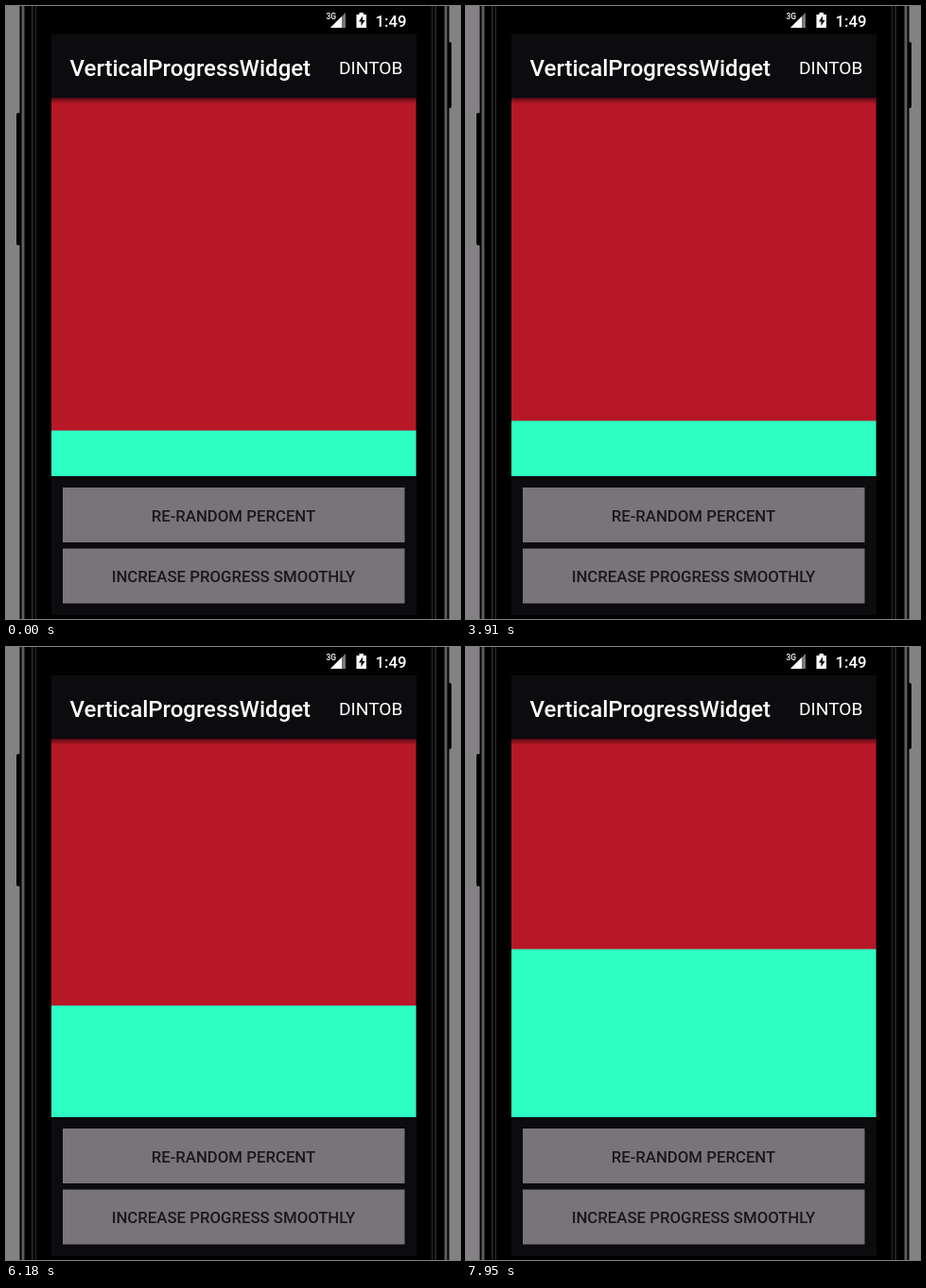
These frames come from a looping animation (480 by 648 pixels, 8000 ms). An HTML page:

```html
<!DOCTYPE html>
<html lang="en">
<head>
<meta charset="utf-8">
<title>Vertical progress</title>
<style>
  html, body { margin: 0; width: 480px; height: 648px; overflow: hidden; background: #000; }
  svg { display: block; }
  text { font-family: Roboto, sans-serif; fill: #fff; font-weight: 500; }
  .label { font-size: 16.8px; text-anchor: middle; fill: #1a181b; }
</style>
</head>
<body>
<svg width="480" height="648" viewBox="0 0 480 648">
  <defs>
    <linearGradient id="shadow" x2="0" y2="1">
      <stop stop-color="#300008" stop-opacity=".6"/>
      <stop offset="1" stop-color="#300008" stop-opacity="0"/>
    </linearGradient>
    <linearGradient id="edge">
      <stop stop-color="#111"/><stop offset=".5" stop-color="#77757a"/><stop offset="1" stop-color="#111"/>
    </linearGradient>
  </defs>

  <!-- phone body -->
  <rect width="480" height="648" fill="#838184"/>
  <rect x="14.5" width="454" height="648"/>
  <rect x="11" y="113" width="5" height="140" rx="2"/>
  <rect x="467" y="38" width="4" height="70" rx="2"/>
  <g fill="url(#edge)">
    <rect x="16" width="4" height="648"/>
    <rect x="463" width="4" height="648"/>
  </g>
  <g fill="#2d2c2f">
    <rect x="27" width="1.5" height="648"/>
    <rect x="31" width="1" height="648"/>
    <rect x="450" width="1" height="648"/>
    <rect x="453.500" width="1.500" height="648"/>
  </g>

  <!-- status bar -->
  <text x="338.500" y="14" font-size="8.500">3G</text>
  <path d="M359 7V23H343Z" fill="#777"/>
  <path d="M355 11V23H343Z" fill="#fff"/>
  <path d="M373.500 7h4.500v2h3v14h-10.500v-14h3Z" fill="#fff"/>
  <path d="M377 10.500l-4 6h2.500v4.500l4-6h-2.500Z"/>
  <text x="390.500" y="22" font-size="16.800">1:49</text>

  <!-- app -->
  <rect x="48" y="30" width="386" height="614" fill="#0c0b0e"/>
  <text x="67.500" y="73.500" font-size="24">VerticalProgressWidget</text>
  <text x="419.500" y="72" font-size="19.200" text-anchor="end" style="font-weight:400">DINTOB</text>
  <rect x="48" y="97.500" width="385.500" height="399.500" fill="#b71828"/>
  <rect id="bar" x="48" width="385.500" fill="#2dffc3"/>
  <rect x="48" y="97.500" width="385.500" height="6" fill="url(#shadow)"/>
  <rect x="60" y="509" width="361.500" height="58" fill="#787478"/>
  <rect id="increase" x="60" y="573.500" width="361.500" height="58" fill="#787478"/>
  <text class="label" x="240.500" y="544.500">RE-RANDOM PERCENT</text>
  <text class="label" x="240.500" y="609">INCREASE PROGRESS SMOOTHLY</text>
</svg>
<script>
const LOOP = 8000, BOTTOM = 497, FULL = 399.5;
const bar = document.getElementById('bar');
const increase = document.getElementById('increase');

// [start ms, duration ms, target height]
const moves = [
  [-225, 1000, FULL], [850, 1020, 0], [2070, 600, 36.5],
  [3400, 1000, 79], [4810, 1000, 118], [6170, 1000, 155], [7400, 1000, 194]
];
const presses = [[3180, 3400], [4730, 4790], [6050, 6140], [7320, 7390]];

const ease = u => (1 - Math.cos(Math.PI * Math.min(1, Math.max(0, u)))) / 2;

function draw(now) {
  const t = now % LOOP;
  let height = 0;
  for (const [start, duration, target] of moves)
    height += (target - height) * ease((t - start) / duration);
  bar.setAttribute('y', BOTTOM - height);
  bar.setAttribute('height', height);
  const pressed = presses.some(([from, to]) => t >= from && t < to);
  increase.setAttribute('fill', pressed ? '#666366' : '#787478');
  requestAnimationFrame(draw);
}
draw(0);
</script>
</body>
</html>
```
